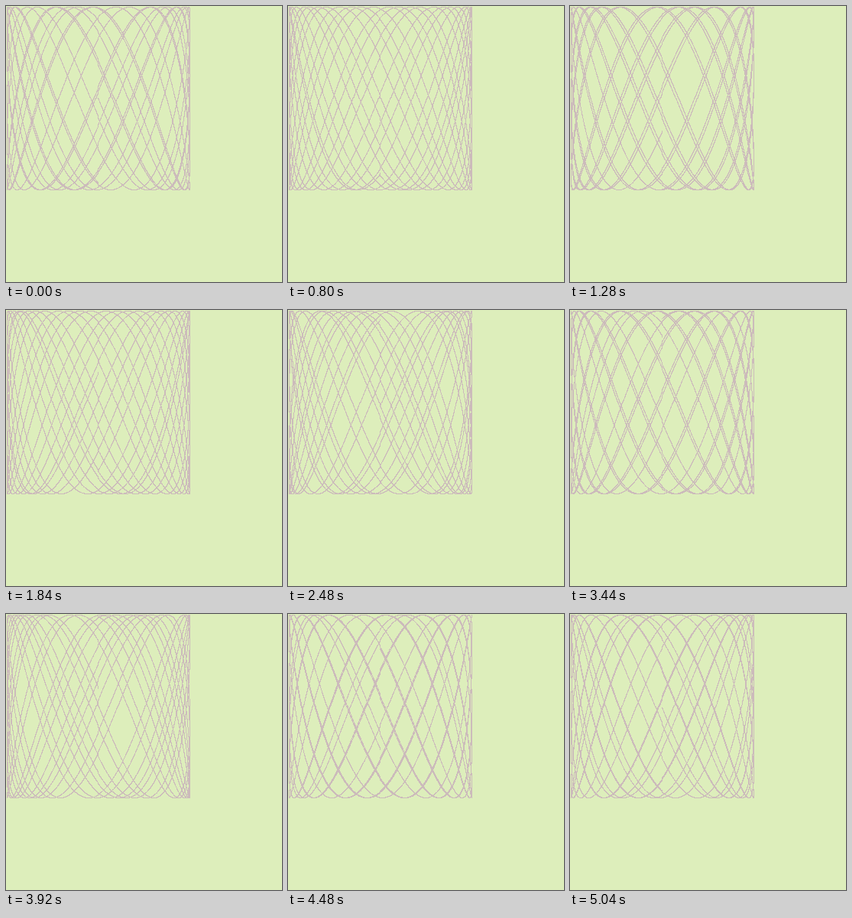
These frames come from a looping animation (361x361 px, 5.12 s). An HTML page with a canvas:

```html
<!DOCTYPE html>
<html lang="en">
<head>
<meta charset="utf-8">
<title>Lissajous</title>
<style>
html, body { margin: 0; width: 100%; height: 100%; overflow: hidden; background: #ddeebb; }
canvas { display: block; width: 361px; height: 361px; image-rendering: pixelated; }
</style>
</head>
<body>
<canvas id="stage" width="361" height="361"></canvas>
<script>
const STAGE = 361;
const SIZE = 120;
const CYCLES = 10;
const STEP = 0.001;
const FREQ = 2.4188;
const FRAMES = 64;
const DELAY = 80;
const INK = "#ccbbbb";
const PAPER = "#ddeebb";

const ctx = document.getElementById("stage").getContext("2d");
const image = ctx.createImageData(STAGE, STAGE);
const pixels = new Uint32Array(image.data.buffer);

// Packs "#rrggbb" as a little-endian opaque pixel.
function pack(hex) {
  const n = parseInt(hex.slice(1), 16);
  return (0xff000000 | (n & 255) << 16 | (n & 0xff00) | n >> 16) >>> 0;
}

const ink = pack(INK);
const paper = pack(PAPER);

// Truncating toward zero gives the small jog along the centre lines.
const toPixel = v => SIZE + Math.trunc(v * SIZE + 0.5);

function draw(phase) {
  pixels.fill(paper);
  for (let t = 0; t < CYCLES * 2 * Math.PI; t += STEP) {
    const x = toPixel(Math.sin(t));
    const y = toPixel(Math.sin(t * FREQ + phase));
    pixels[y * STAGE + x] = ink;
  }
  ctx.putImageData(image, 0, 0);
}

const start = performance.now();
let shown = -1;

function tick() {
  const elapsed = Math.max(0, performance.now() - start);
  const index = Math.floor(elapsed / DELAY) % FRAMES;
  if (index !== shown) {
    shown = index;
    draw(index * 0.1);
  }
  requestAnimationFrame(tick);
}

tick();
</script>
</body>
</html>
```
